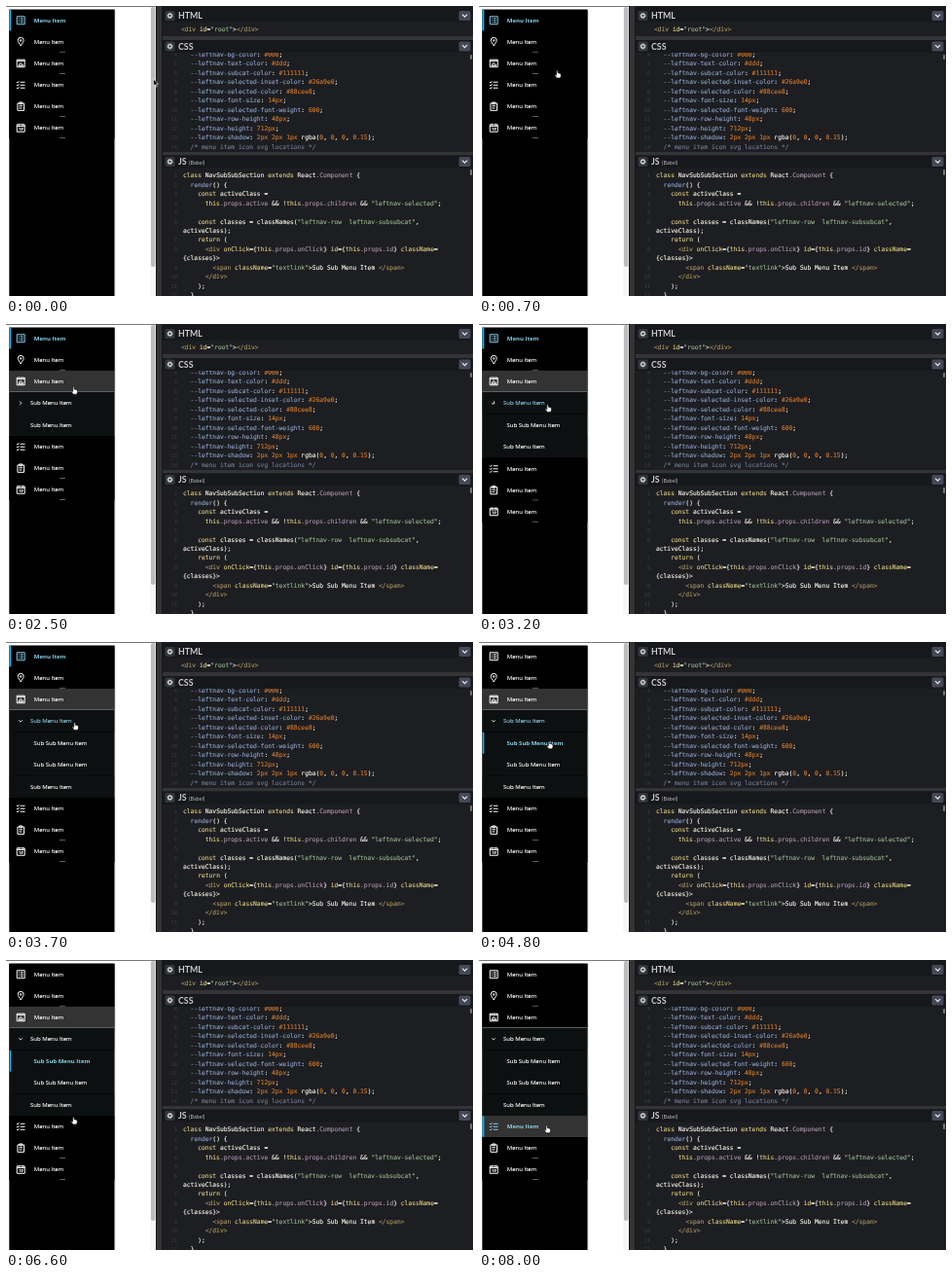
Write an HTML page that moves like this. It is 480 by 298 pixels and loops after 8100 ms.

```html
<!DOCTYPE html>
<html lang="en">
<head>
<meta charset="utf-8">
<title>Nested left navigation</title>
<style>
  html, body { margin: 0; width: 100%; height: 100%; overflow: hidden; background: #fff; }
  svg { display: block; width: 100vw; height: 100vh; }
  text { white-space: pre; }
  .code, .code tspan { fill: currentColor; stroke: currentColor; stroke-width: .14; }
  .code { font: 6.31px "DejaVu Sans Mono", monospace; color: #f6f3e6; }
  .gutter { font: 5.4px "DejaVu Sans Mono", monospace; fill: #3a3c45; text-anchor: end; }
  .title { font: 700 8.8px Lato, sans-serif; fill: #ccccd0; }
  .label { font: 500 6px "Open Sans", sans-serif; fill: currentColor; stroke: currentColor; stroke-width: .12; }
  .icon { fill: none; stroke: currentColor; }
  .row { color: #fff; }
  .row.open { color: #88cee8; }
  .inset { fill: #26a9e0; visibility: hidden; }
  .selected { color: #88cee8; }
  .selected .label { font-weight: 700; stroke-width: 0; }
  .selected .inset { visibility: visible; }
</style>
</head>
<body>
<svg id="stage" viewBox="0 0 480 298" preserveAspectRatio="none"></svg>
<script>
const LOOP = 8100, STEP = 100, ROW = 22.1, SUB = 22.5;
const NAV_LEFT = 3.3, NAV_WIDTH = 108.2, NAV_TOP = 3.7;
const LINE = 9.47;
const stage = document.getElementById('stage');

const rect = (x, y, w, h, fill, more = '') =>
  `<rect x="${x}" y="${y}" width="${w}" height="${h}" fill="${fill}" ${more}/>`;
const escapeText = s => s.replace(/&/g, '&amp;').replace(/</g, '&lt;');

// Code panes

const css = [
  '--leftnav-bg-color: #000;', '--leftnav-text-color: #ddd;',
  '--leftnav-subcat-color: #111111;', '--leftnav-selected-inset-color: #26a9e0;',
  '--leftnav-selected-color: #88cee8;', '--leftnav-font-size: 14px;',
  '--leftnav-selected-font-weight: 600;', '--leftnav-row-height: 48px;',
  '--leftnav-height: 712px;', '--leftnav-shadow: 2px 2px 1px rgba(0, 0, 0, 0.15);',
  '/* menu item icon svg locations */'
].map((s, i) => [i + 4, '  ' + s]);

const js = [
  [1, 'class NavSubSubSection extends React.Component {'],
  [2, '  render() {'],
  [3, '    const activeClass ='],
  [4, '      this.props.active && !this.props.children && "leftnav-selected";'],
  [5, ''],
  [6, '    const classes = classNames("leftnav-row  leftnav-subsubcat",'],
  ['', 'activeClass);'],
  [7, '    return ('],
  [8, '      <div onClick={this.props.onClick} id={this.props.id} className='],
  ['', '{classes}>'],
  [9, '        <span className="textlink">Sub Sub Menu Item </span>'],
  [10, '      </div>'],
  [11, '    );'],
  [12, '  }']
];

const rules = [
  [/^\/\*.*\*\//, '#717790'],
  [/^"[^"]*"/, '#96b38a'],
  [/^<\/?\w+>?/, '#a7925a'],
  [/^(#[0-9a-f]{3,6}|\d[\d.]*(px)?)\b/, '#d0782a'],
  [/^(class|extends|const|return|this)\b/, '#ddca7e'],
  [/^(onClick|id|className)(?==)/, '#ddca7e'],
  [/^(--[\w-]+|render)/, '#8b9fc4'],
  [/^\.[a-zA-Z]+/, '#a691a6'],
  [/^([\w-]+|[^\w])/, '']
];

function highlight(line) {
  let out = '';
  while (line) {
    const [pattern, color] = rules.find(([p]) => p.test(line));
    const token = line.match(pattern)[0];
    out += color ? `<tspan color="${color}">${escapeText(token)}</tspan>` : escapeText(token);
    line = line.slice(token.length);
  }
  return out;
}

const codeLines = (lines, x, y) => lines.map(([n, s], i) => {
  const base = y + i * LINE + 2.2;
  return `<text class="gutter" x="176" y="${base}">${n}</text>` +
    `<text class="code" x="${x}" y="${base}">${highlight(s)}</text>`;
}).join('');

const header = (name, y, note = '') => `
  ${rect(161, y, 319, 13, '#17181b')}
  ${rect(163.5, y + 1.5, 10, 10, '#34363e', 'rx="1.5"')}
  <circle cx="168.5" cy="${y + 6.5}" r="1.8" fill="none" stroke="#ddd" stroke-width="1.3"/>
  <circle cx="168.5" cy="${y + 6.5}" r="2.6" fill="none" stroke="#ddd" stroke-width=".8" stroke-dasharray="1 1.04"/>
  <text class="title" x="177" y="${y + 9.6}">${name}</text>
  <text x="188" y="${y + 9.2}" font-family="Lato, sans-serif" font-size="5.4" fill="#bbb">${note}</text>
  ${rect(465.5, y + 1.5, 12, 10, '#444857', 'rx="1.5"')}
  <path d="M469 ${y + 5.2}l2.5 2.5 2.5-2.5" fill="none" stroke="#eee" stroke-width="1.2"/>`;

const editor = `
  ${rect(154, 0, 326, 298, '#343436')}
  ${rect(154, 0, .8, 298, '#111')}${rect(160.2, 0, .8, 298, '#111')}
  ${rect(161, 0, 319, 31, '#1d1e22')}
  ${rect(161, 35, 319, 115, '#1d1e22')}
  ${rect(161, 153.5, 319, 145, '#1d1e22')}
  ${codeLines([['', '<div id="root"></div>']], 180, 24)}
  ${codeLines(css, 182, 49.8)}
  ${codeLines(js, 182, 174)}
  ${rect(161, 0, 319, 4, '#17181b')}
  ${header('HTML', 3.5)}${header('CSS', 35)}${header('JS', 153.5, '(Babel)')}
  ${rect(477, 50, 2, 5, '#777', 'rx="1"')}${rect(477, 168, 2, 6, '#777', 'rx="1"')}`;

// Navigation

const icons = [
  'M-4-4H4V4H-4ZM-2.5-2h1M-.5-2h3M-2.5 0h1M-.5 0h3M-2.5 2h1M-.5 2h3',
  'M0 4.2C-1 2-3-.2-3-1.5a3 3 0 0 1 6 0C3-.2 1 2 0 4.2ZM-.8-1.4a.8.8 0 1 0 1.6 0a.8.8 0 1 0-1.6 0',
  'M-4-3.8H4V3.8H-4ZM-4-2.6H4M-2.4 2.4L-.8 0 .6 1.4 1.4.6 2.6 2.4ZM-.6-.8h1.2',
  'M-4.3-3l1 1L-1.8-3.8M-4.3 0l1 1L-1.8-.8M-4.3 3l1 1L-1.8 2.2M-.5-2.8H4.3M-.5.2H4.3M-.5 3.2H4.3',
  'M-3.3-3.2H3.3V4.2H-3.3ZM-1.4-4.2H1.4V-2.4H-1.4ZM-1.8-.4H1.8M-1.8 1.8H1',
  'M-4-3.4H4V4H-4ZM-4-1.8H4M-2-4.4V-2.6M2-4.4V-2.6M-1.6.2H-.4V2.6M.8.2H2L1.2 2.6'
];

const navRow = (id, text, x, height, bg, extra = '') => `
  <g id="${id}" class="row">
    ${rect(NAV_LEFT, 0, NAV_WIDTH, height, bg, 'class="bg"')}
    ${rect(NAV_LEFT, .3, 2, height - .6, '#26a9e0', 'class="inset"')}
    ${extra}
    <text class="label" x="${x}" y="${height / 2 + 2.1}">${text}</text>
  </g>`;

const mainRow = i => navRow('row' + i, 'Menu Item', 28.8, ROW, '#000',
  `<path class="icon" transform="translate(15.2 ${ROW / 2})" d="${icons[i]}"/>` +
  ([0, 3].includes(i) ? '' : rect(55, ROW - 1, 6, .7, '#888', 'class="dash"')));

const subRow = (id, text, x, extra) => navRow(id, text, x, SUB, '#0d1010', extra);

const clip = name => `<clipPath id="${name}Area">
  <rect id="${name}Clip" x="${NAV_LEFT}" width="${NAV_WIDTH}" height="0"/></clipPath>`;

stage.innerHTML = `
  <defs>${clip('open')}${clip('inner')}</defs>
  ${rect(0, 0, 154, 298, '#fff')}
  ${rect(0, 0, 154, 1, '#777')}
  ${rect(111.5, 5, 1, 293, '#000', 'opacity=".15"')}
  ${rect(148.2, 1, 5.8, 297, '#f6f6f6')}
  ${rect(149, 1, 4.4, 267, '#bcbcbc', 'rx="2"')}
  ${rect(NAV_LEFT, NAV_TOP, NAV_WIDTH, 295, '#000')}
  ${icons.map((_, i) => mainRow(i)).join('')}
  <g transform="translate(0 ${NAV_TOP + 3 * ROW})">
    <g clip-path="url(#openArea)">
      ${subRow('subA', 'Sub Menu Item', 25,
        `<path id="chevron" d="M-.9-1.8L.9 0-.9 1.8" fill="none" stroke="#eee" stroke-width=".9"/>`)}
      <g transform="translate(0 ${SUB})"><g clip-path="url(#innerArea)">
        ${subRow('leafA', 'Sub Sub Menu Item', 28.5)}
        ${subRow('leafB', 'Sub Sub Menu Item', 28.5)}
      </g></g>
      ${subRow('subB', 'Sub Menu Item', 25)}
    </g>
    ${rect(NAV_LEFT, -.9, NAV_WIDTH, .9, '#666', 'id="border"')}
  </g>
  ${editor}
  <g id="ring">
    <circle r="13.5" fill="#fff" fill-opacity=".08" stroke="#ddd" stroke-width=".9"/>
    <circle r="11.3" fill="none" stroke="#aaa" stroke-width=".6" stroke-dasharray="1 1"/>
  </g>
  <g id="arrow">
    <path d="M0 0V7L1.6 5.6 2.7 8.1 3.8 7.6 2.8 5.2H5Z" fill="#000" stroke="#fff" stroke-width=".6"/>
  </g>
  <g id="hand">
    <path transform="scale(.88)" fill="#fff" stroke="#000" stroke-width=".7"
      d="M-.8 4.6V.6Q0-.4.8.6V3Q1.7 2.5 2.2 3.3 3.1 2.9 3.5 3.8 4.5 3.6 4.5 4.8V6.4L3.7 8.8H-.4L-2.6 5.6Q-2.4 4.3-.8 5.6Z"/>
  </g>`;

const el = Object.fromEntries([...stage.querySelectorAll('[id]')].map(e => [e.id, e]));

// Timeline

const pointer = [
  [0, 151.5, 75], [900, 70, 65], [1000, 69.5, 64.5], [2500, 69.5, 64.5], [2900, 70.5, 82.7],
  [3900, 70.5, 82.7], [4300, 72, 102], [5300, 72, 102], [6000, 70, 138],
  [6600, 69.3, 161.2], [6900, 69.5, 170], [8100, 69.5, 170]
];
const clicks = [1600, 2900, 4400, 7300];

const ease = p => p * p * (3 - 2 * p);
const ramp = (t, from, to) => ease(Math.min(1, Math.max(0, (t - from) / (to - from))));
const move = (node, x, y) => node.setAttribute('transform', `translate(${x} ${y})`);
const show = (node, on) => { node.style.display = on ? '' : 'none'; };
const select = (node, on) => node.classList.toggle('selected', on);
const fill = (node, color) => node.querySelector('.bg').setAttribute('fill', color);

function pointerAt(t) {
  const i = Math.max(1, pointer.findIndex(p => p[0] > t));
  const [t0, x0, y0] = pointer[i - 1], [t1, x1, y1] = pointer[i];
  const p = ramp(t, t0, t1);
  return [x0 + (x1 - x0) * p, y0 + (y1 - y0) * p];
}

function draw(t) {
  const open = ramp(t, 1700, 2200), inner = ramp(t, 3000, 3400);
  const innerHeight = inner * 2 * SUB;
  const openHeight = open * (2 * SUB + innerHeight);
  const [x, y] = pointerAt(t);

  for (let i = 0; i < 6; i++)
    move(el['row' + i], 0, NAV_TOP + i * ROW + (i > 2 ? openHeight : 0));
  el.openClip.setAttribute('height', openHeight);
  el.innerClip.setAttribute('height', innerHeight);
  move(el.leafB, 0, SUB);
  move(el.subB, 0, SUB + innerHeight);
  el.chevron.setAttribute('transform', `translate(15 ${SUB / 2}) rotate(${90 * inner})`);

  select(el.row0, t < 4500);
  select(el.leafA, t >= 4500 && t < 7400);
  select(el.row3, t >= 7400);
  fill(el.row2, t >= 900 && t < 7400 ? '#333' : '#000');
  fill(el.row3, t >= 6700 ? '#333' : '#000');
  el.subA.classList.toggle('open', t >= 2800 && t < 5000);
  show(el.row2.querySelector('.dash'), open === 0);
  show(el.border, open > 0);

  const overNav = x < NAV_LEFT + NAV_WIDTH;
  show(el.arrow, !overNav);
  show(el.hand, overNav);
  move(overNav ? el.hand : el.arrow, x, y);

  const start = clicks.find(c => t >= c && t < c + 300);
  show(el.ring, start !== undefined);
  if (start !== undefined) {
    const age = t - start;
    el.ring.setAttribute('transform', `translate(${x} ${y}) scale(${.65 + .35 * Math.min(1, age / 100)})`);
    el.ring.setAttribute('opacity', age > 100 ? .5 : 1);
  }
}

function frame() {
  draw(Math.floor(performance.now() % LOOP / STEP) * STEP);
  requestAnimationFrame(frame);
}
frame();
</script>
</body>
</html>
```
